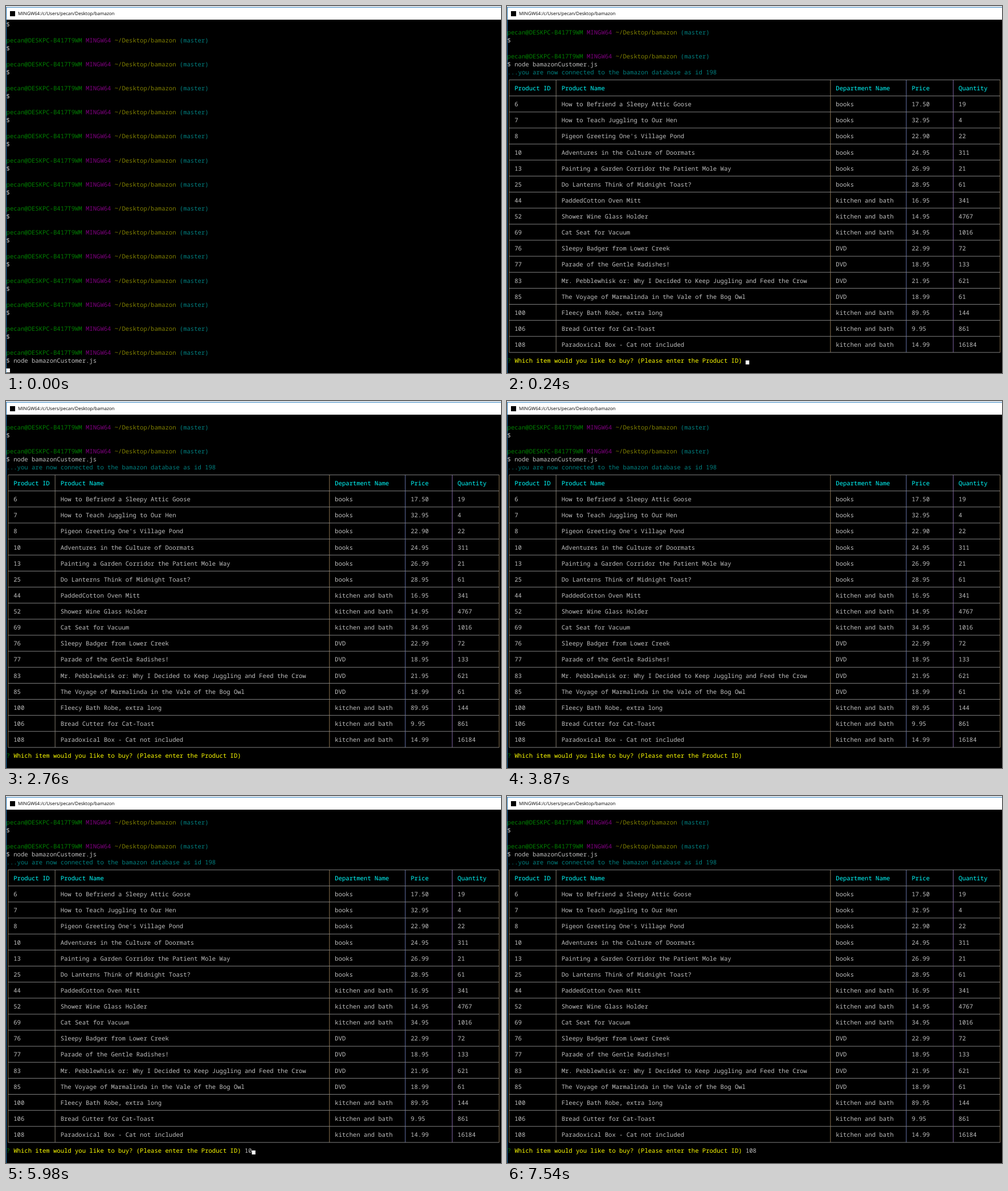
Recreate the animation shown at these times as an HTML page with a canvas. Size 869 px wide and 644 px high, loop 8000 ms.

```html
<!DOCTYPE html>
<html lang="en">
<head>
<meta charset="utf-8">
<title>Terminal</title>
<style>
  html, body { margin: 0; width: 100%; height: 100%; overflow: hidden; background: #000; }
  canvas { display: block; }
</style>
</head>
<body>
<canvas id="stage" width="869" height="644"></canvas>
<script>
const ctx = document.getElementById('stage').getContext('2d');

const LOOP = 8000;
const LEFT = 0.6, TOP = 24.2, CELL_W = 6.338, CELL_H = 14.065;
const BASELINE = 11.3;

const GREY = '#c0c0c0', GREEN = '#008000', PURPLE = '#800080', OLIVE = '#808000',
      TEAL = '#008080', CYAN = '#00ffff', YELLOW = '#ffff00', RULE = '#808080';

const USER = 'pecan';
const COMMAND = '$ node bamazonCustomer.js';
const QUESTION = 'Which item would you like to buy? (Please enter the Product ID)';
const ANSWER = '108';
const ANSWER_COL = 66;

const TABLE_ROW = 7;
const BORDERS = [0, 13, 89, 110, 123, 136];
const BORDER_TINTS = ['#8a7350', '#80796c', '#8a7350', '#6672a8', '#7c62a0', '#8a7350'];
const HEADER = ['Product ID', 'Product Name', 'Department Name', 'Price', 'Quantity'];
const ITEMS = `
6|How to Befriend a Sleepy Attic Goose|books|17.50|19
7|How to Teach Juggling to Our Hen|books|32.95|4
8|Pigeon Greeting One's Village Pond|books|22.90|22
10|Adventures in the Culture of Doormats|books|24.95|311
13|Painting a Garden Corridor the Patient Mole Way|books|26.99|21
25|Do Lanterns Think of Midnight Toast?|books|28.95|61
44|PaddedCotton Oven Mitt|kitchen and bath|16.95|341
52|Shower Wine Glass Holder|kitchen and bath|14.95|4767
69|Cat Seat for Vacuum|kitchen and bath|34.95|1016
76|Sleepy Badger from Lower Creek|DVD|22.99|72
77|Parade of the Gentle Radishes!|DVD|18.95|133
83|Mr. Pebblewhisk or: Why I Decided to Keep Juggling and Feed the Crow|DVD|21.95|621
85|The Voyage of Marmalinda in the Vale of the Bog Owl|DVD|18.99|61
100|Fleecy Bath Robe, extra long|kitchen and bath|89.95|144
106|Bread Cutter for Cat-Toast|kitchen and bath|9.95|861
108|Paradoxical Box - Cat not included|kitchen and bath|14.99|16184
`.trim().split('\n').map(line => line.split('|'));

const LAUNCH = 240;
const KEY_TIMES = [5700, 5980, 6380];
// The cursor starts visible and flips at each of these times.
const BLINKS = [120, 240, 640, 1200, 1760, 2200, 2760, 3290, 3870, 4430,
                4860, 5420, 6530, 6960, 7540];

const cellX = col => LEFT + col * CELL_W;
const cellY = row => TOP + row * CELL_H;
const countPast = (times, t) => times.filter(time => t >= time).length;

function rect(x, y, w, h, color) {
  ctx.fillStyle = color;
  ctx.fillRect(x, y, w, h);
}

function print(row, col, text, color) {
  ctx.fillStyle = color;
  const y = cellY(row) + BASELINE;
  [...text].forEach((ch, i) => {
    if (ch !== ' ') ctx.fillText(ch, cellX(col + i), y);
  });
}

function prompt(row) {
  const parts = [
    [USER + '@DESKPC-B417T9WM', GREEN],
    ['MINGW64', PURPLE],
    ['~/Desktop/bamazon', OLIVE],
    ['(master)', TEAL]
  ];
  let col = 0;
  for (const [text, color] of parts) {
    print(row, col, text, color);
    col += text.length + 1;
  }
}

function cursor(row, col) {
  rect(cellX(col), cellY(row) + CELL_H / 2, CELL_W, CELL_H / 2, '#fff');
}

function drawWindow() {
  rect(0, 0, 869, 644, '#000');
  rect(0, 0, 869, 24, '#fff');
  rect(0, 0, 869, 2, '#dfe3e8');
  rect(0, 2, 869, 1, '#4a94cc');
  rect(0, 2, 1, 642, '#1f70b0');
  rect(7, 9, 9, 9, '#000');
  ctx.font = '8.08px "Open Sans", "Noto Sans", sans-serif';
  ctx.fillText('MINGW64:/c/Users/' + USER + '/Desktop/bamazon', 21, 16);
  ctx.font = '500 10.56px "Noto Sans Mono", "DejaVu Sans Mono", monospace';
}

function drawHistory() {
  for (let row = 0; row < 42; row += 3) {
    print(row, 0, '$', GREY);
    prompt(row + 2);
  }
  print(42, 0, COMMAND, GREY);
}

// Rules keep their fractional place, so they soften like scaled-down lines.
function drawTable() {
  const midX = col => cellX(col + 0.5);
  const midY = row => cellY(row + 0.5);
  const lines = [HEADER, ...ITEMS];
  const left = midX(BORDERS[0]), width = midX(BORDERS[5]) - left;
  const top = midY(TABLE_ROW), height = midY(TABLE_ROW + 2 * lines.length) - top;

  BORDERS.forEach((col, i) => rect(midX(col) - 0.5, top, 1, height, BORDER_TINTS[i]));
  for (let i = 0; i <= lines.length; i++) {
    rect(left, midY(TABLE_ROW + 2 * i) - 0.5, width, 1, RULE);
  }
  lines.forEach((cells, i) => cells.forEach((text, j) =>
    print(TABLE_ROW + 1 + 2 * i, BORDERS[j] + 2, text, i ? GREY : CYAN)));
}

function drawShop(typed) {
  prompt(1);
  print(2, 0, '$', GREY);
  prompt(4);
  print(5, 0, COMMAND, GREY);
  print(6, 0, '...you are now connected to the bamazon database as id 198', TEAL);
  drawTable();
  print(42, 0, '?', GREEN);
  print(42, 2, QUESTION, YELLOW);
  print(42, ANSWER_COL, ANSWER.slice(0, typed), GREY);
}

let shown = '';

function frame() {
  const t = performance.now() % LOOP;
  const launched = t >= LAUNCH;
  const typed = countPast(KEY_TIMES, t);
  const lit = countPast(BLINKS, t) % 2 === 0;
  const state = [launched, typed, lit].join();

  if (state !== shown) {
    shown = state;
    drawWindow();
    if (launched) drawShop(typed);
    else drawHistory();
    if (lit) cursor(launched ? 42 : 43, launched ? ANSWER_COL + typed : 0);
  }
  requestAnimationFrame(frame);
}

ctx.textRendering = 'geometricPrecision';
frame();
</script>
</body>
</html>
```
